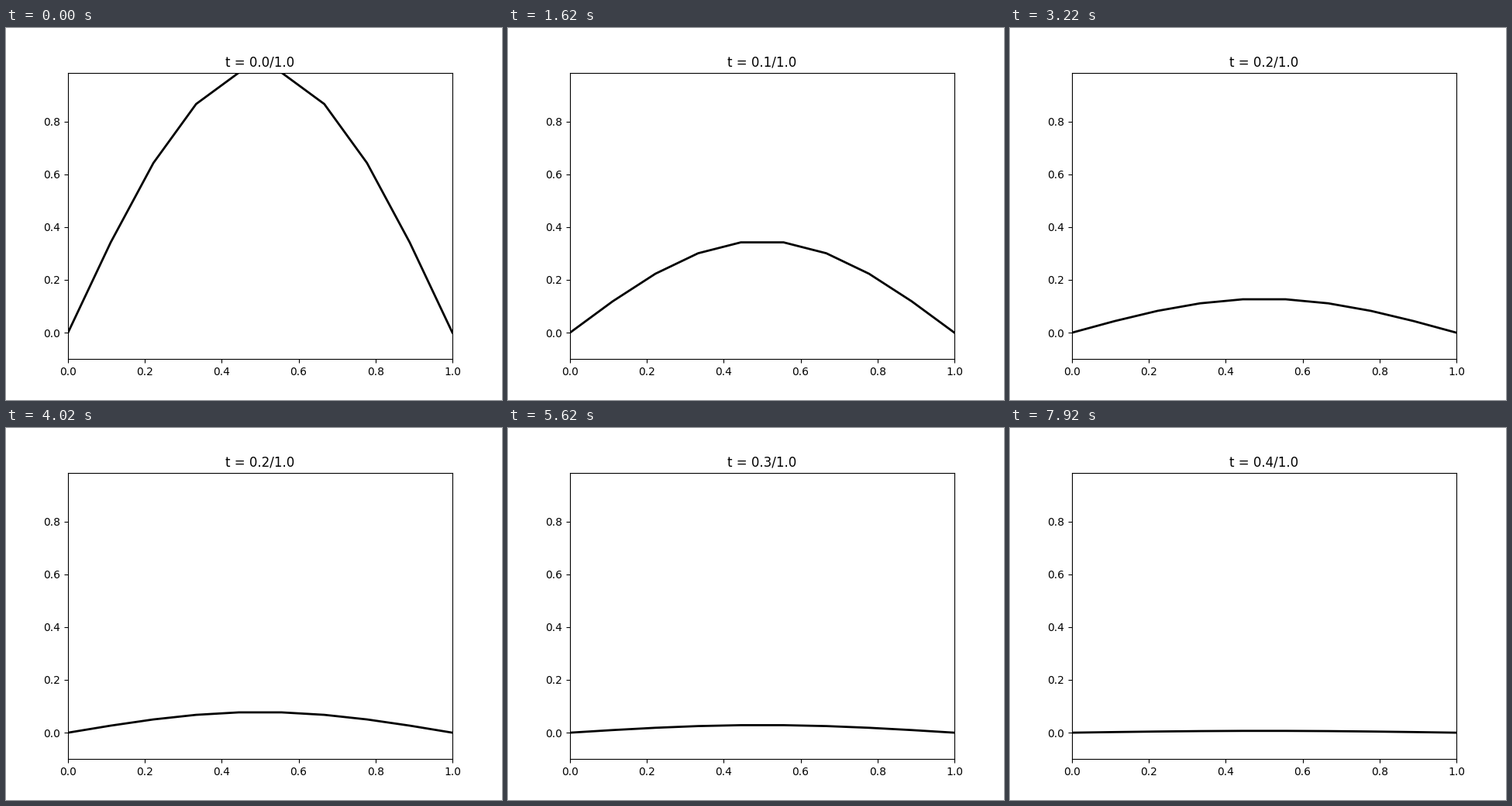
Animation of 640 by 480 pixels, one loop 8000 ms. Source, as a matplotlib script:

```python
import numpy as np
import matplotlib.pyplot as plt
from matplotlib.animation import FuncAnimation

POINTS = 10
DX = 1 / POINTS
RATIO = 0.5                 # diffusion number of the explicit scheme
DT = RATIO * DX**2
T_END = 1.0
TICK = 20                   # ms per animation frame
TICKS_PER_STEP = 5
FRAMES = 400

plt.rcParams["font.family"] = "DejaVu Sans"

x = np.linspace(0, 1, POINTS)
start = np.sin(np.pi * x)
# A sine mode only shrinks by a constant factor at each explicit step.
decay = 1 - 2 * RATIO * (1 - np.cos(np.pi / (POINTS - 1)))

fig, ax = plt.subplots(figsize=(6.4, 4.8), dpi=100)
ax.set_xlim(0, 1)
ax.set_ylim(-0.1, start.max())
line, = ax.plot(x, start, color="black", linewidth=2)
title = ax.set_title("")


def update(frame):
    step = (frame + TICKS_PER_STEP - 1) // TICKS_PER_STEP
    line.set_ydata(start * decay**step)
    title.set_text(f"t = {(step + 1) * DT:.1f}/{T_END:.1f}")
    return line, title


anim = FuncAnimation(fig, update, frames=FRAMES, interval=TICK,
                     repeat=True, repeat_delay=0, blit=False)
plt.show()
```
